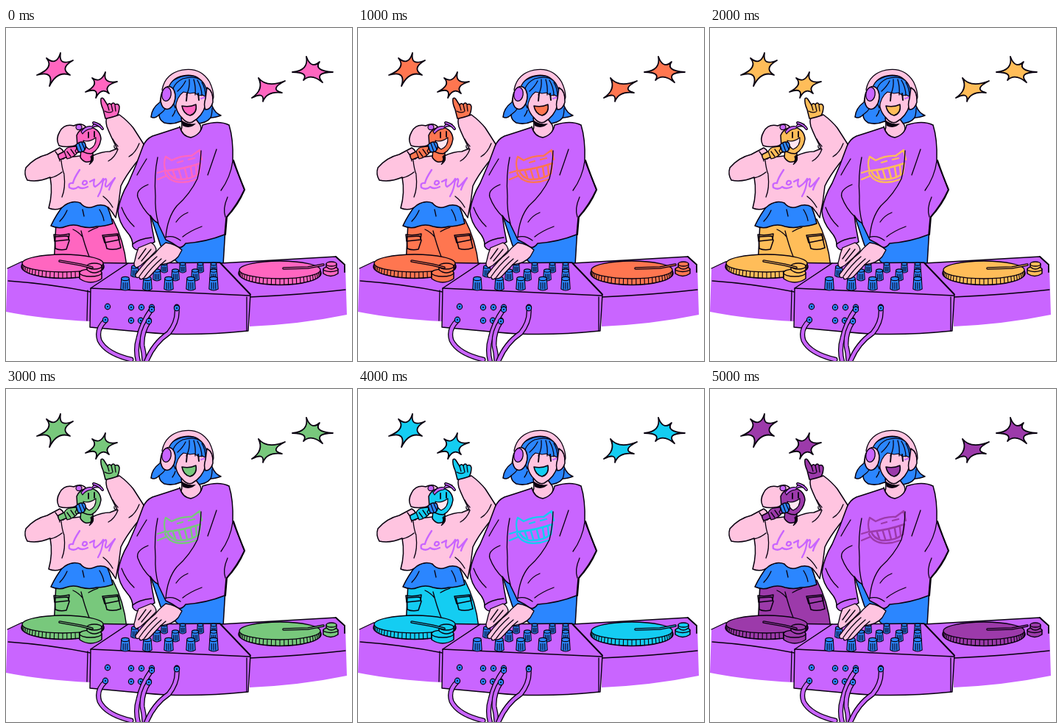
These frames come from a looping animation (470 px wide and 453 px high, 6000 ms). An HTML page with a canvas:

```html
<!DOCTYPE html>
<html lang="en">
<head>
<meta charset="utf-8">
<title>DJ set</title>
<style>
html, body { margin: 0; width: 100%; height: 100%; overflow: hidden; background: #fff; }
canvas { display: block; }
</style>
</head>
<body>
<canvas id="stage" width="470" height="453"></canvas>
<script>
const ctx = document.getElementById('stage').getContext('2d');
const INK = '#08000f', PURPLE = '#c965ff', PINK = '#ffc4e0', BLUE = '#2b86ff';
const ACCENTS = ['#ff66c0', '#ff7650', '#ffbd59', '#78c87c', '#14cdf2', '#9c3aaa'];
const STEP = 1000;
ctx.lineJoin = ctx.lineCap = 'round';

function shape(d, fill, width = 1.5) {
  const path = new Path2D(d);
  if (fill) {
    ctx.fillStyle = fill;
    ctx.fill(path);
  }
  if (width) line(path, INK, width);
}

function line(d, color = INK, width = 1.3) {
  ctx.strokeStyle = color;
  ctx.lineWidth = width;
  ctx.stroke(d instanceof Path2D ? d : new Path2D(d));
}

function oval(x, y, rx, ry, fill, width = 1.3, turn = 0) {
  const path = new Path2D();
  path.ellipse(x, y, rx, ry, turn, 0, Math.PI * 2);
  shape(path, fill, width);
}

// Inked tube: a dark stroke below a thinner coloured one.
function tube(d, color, width) {
  line(d, INK, width + 2.6);
  line(d, color, width);
}

// Spiky star: each pair of tips is joined by an arc bent towards the centre.
function star(cx, cy, tips, fill) {
  const path = new Path2D();
  path.moveTo(...tips[0]);
  tips.forEach((tip, i) => {
    const next = tips[(i + 1) % tips.length];
    const mx = (tip[0] + next[0]) / 2, my = (tip[1] + next[1]) / 2;
    path.quadraticCurveTo(mx + (cx - mx) * .85, my + (cy - my) * .85, ...next);
  });
  shape(path, fill, 1.8);
}

function stars(accent) {
  star(69, 55, [[74, 34], [91, 44], [87, 64], [59, 79], [42, 64], [55, 41]], accent);
  star(129, 78, [[135, 60], [151, 73], [140, 89], [122, 95], [108, 87], [117, 68]], accent);
  star(353, 84, [[343, 68], [379, 72], [375, 88], [349, 100], [334, 95]], accent);
  star(414, 59, [[408, 39], [426, 46], [444, 60], [430, 74], [404, 71], [389, 60]], accent);
}

function singer(accent) {
  shape('M68 264L65 324H164Q160 288 145 260Z', accent);
  line('M102 276Q107 296 113 311M112 277Q118 273 125 271M104 284Q98 277 91 274');
  shape('M66 284L84 283L86 289L82 301Q74 303 67 300Z', null);
  shape('M65 281Q75 283 86 280L85 288L66 290Z', null);
  shape('M133 284L152 282L156 299Q146 303 137 300Z', null);
  shape('M131 282L152 280L154 288L134 292Z', null);

  shape('M79 240Q68 254 61 269Q72 274 81 270Q92 266 102 270Q114 273 123 270Q134 270 145 266Q141 248 135 238Q100 231 79 240Z', BLUE);
  line('M83 248Q79 257 73 263M104 247L106 256M127 247Q132 255 133 262');

  // Raised hand
  shape('M135 123L132 111Q128 102 129 96Q131 94 133 97L138 105Q140 101 143 104Q146 100 148 104Q153 102 154 107Q154 114 151 119L150 125Z', accent);
  line('M138 105L140 112M143 104L145 113M148 105L149 113M134 113Q139 116 144 114');

  // Hoodie
  shape('M74 177L101 174L117 174Q130 168 141 168L151 164Q142 147 137 134Q135 125 137 123Q146 121 154 118Q165 126 173 136Q182 150 187 158Q185 175 176 184Q162 202 156 215Q154 236 149 258Q145 251 139 244Q130 238 119 243Q108 247 101 238Q91 234 80 241Q71 250 58 245Q64 224 60 203Q44 210 29 207Q24 199 27 190Q39 176 56 172L73 163Q81 167 78 178Z', PINK);
  line('M60 204Q69 202 76 196M75 180Q76 191 79 199M79 200Q81 218 76 230M67 168Q72 174 73 181M147 160Q146 164 152 165Q148 176 139 181M181 157Q176 170 167 175M145 151Q148 157 152 161M132 229Q140 235 145 244');
  line('M100 193Q92 205 91 211Q84 210 86 217Q93 221 98 216Q103 220 111 216M106 208Q110 207 110 211Q107 215 104 212Q104 209 106 208M114 209L120 206Q118 215 121 216Q128 212 132 205Q131 219 125 229M132 208Q137 202 136 209Q133 218 138 215Q144 209 148 204Q142 213 140 220', PURPLE, 2.3);

  // Head
  shape('M102 164L101 176Q108 187 118 179L118 167Z', accent);
  shape('M118 173Q121 181 113 186Q117 180 115 175Z', INK, 1);
  shape('M72 160Q67 151 73 141Q79 130 92 133Q102 128 108 134L104 144L100 158Q84 164 72 160Z', PINK);
  shape('M96 146Q101 134 115 135Q128 138 129 151Q127 165 116 171Q104 171 97 162Z', accent);
  oval(99, 135, 4, 3.5, PURPLE, 1.2);
  shape('M102 141Q108 132 117 134Q120 127 128 131L126 134Q119 133 116 137Q108 138 104 144Z', PURPLE, 1.2);
  tube('M119 129Q127 131 131 137', PURPLE, 1.4);
  line('M112 142V149M120 141V148', INK, 1.8);
  shape('M105 153Q113 156 122 149Q123 161 113 165Q107 162 105 153Z', '#ffe6f1', 1.2);

  // Microphone
  shape('M71 172L97 159L101 168L74 179Q70 177 71 172Z', accent);
  shape('M95 159Q101 153 107 156Q110 162 106 167Q102 170 98 168Z', BLUE);
  line('M99 157L103 168M103 156L107 165', INK, 1.2);
  shape('M79 168Q82 162 88 162L95 161Q97 164 94 167L96 171Q91 176 83 178Z', accent, 1.2);
  line('M83 168L88 175M88 165L93 172');
}

function catPrint(accent) {
  line('M217 195Q213 184 217 175L225 180Q239 173 252 174L263 166L266 179M206 197L216 194M206 206L218 201M216 197Q223 213 248 209L258 206M233 183L240 181M248 179L256 177', accent, 2.3);
  line('M219 194Q241 192 264 184L262 198Q250 207 233 206Q222 203 219 194M227 195L230 203M235 194L238 204M243 192L246 204M251 190L253 202M258 188L259 199', accent, 2.5);
}

function dj(accent) {
  shape('M196 254L210 296L236 322H295L298 272L240 282Z', BLUE);

  // Hair and neck
  shape('M229 70Q246 60 268 69Q278 82 280 106Q284 116 292 119Q284 122 278 122Q272 130 258 130L237 127Q226 132 215 129Q208 125 208 118Q202 124 197 121Q198 109 209 101Q214 78 229 70Z', BLUE);
  line('M208 118Q214 114 217 109M280 109Q280 117 278 122M226 120Q229 116 230 112');
  shape('M238 122Q241 138 235 144Q246 154 260 147Q267 139 264 132L258 124Z', PINK);
  shape('M238 125Q246 132 258 130Q250 138 240 133Z', INK, 0);

  // Sweater
  shape('M236 135Q215 142 199 147Q190 151 186 161Q177 187 166 211Q155 229 152 249Q153 264 164 277Q173 287 172 297Q176 304 183 301L202 291Q198 272 196 255Q201 263 206 265L217 288Q226 292 234 298Q239 300 244 293Q272 291 297 281L299 258Q316 241 324 220Q314 195 308 180Q309 151 303 132Q289 125 267 132Q265 145 251 149Q239 147 236 134Z', PURPLE);
  catPrint(accent);
  line('M265 167Q264 190 260 205Q250 226 232 242Q219 258 217 285M286 165Q280 183 274 200M191 178Q184 189 178 200M206 176Q201 200 203 229Q202 248 207 266M193 213Q176 220 179 230Q185 246 197 257M216 285Q226 281 237 289M172 294Q180 287 198 285M308 181Q305 203 292 221M298 257Q294 246 301 230M266 270Q250 276 240 284M231 264Q237 255 247 251M157 244Q163 260 174 270');
  line('M309 180Q315 198 324 220Q314 241 300 257L298 281', INK, 2);

  // Head and headphones
  shape('M231 90Q227 110 239 122Q246 131 253 128Q267 120 271 105L273 84Q256 72 238 76Z', PINK);
  shape('M226 99Q222 78 240 69Q263 62 273 80Q276 90 273 95L267 91L262 92L256 88L250 89L241 87Q232 93 230 109Z', BLUE, 1.2);
  line('M244 72Q240 80 233 86M249 70Q250 82 245 91M255 70Q258 80 257 91M260 71Q266 81 266 92M266 74Q271 82 271 93');
  line('M246 89L245 99M261 89L262 98', INK, 1.9);
  line('M265 96L271 94', PURPLE, 2.2);
  shape('M239 106Q250 108 258 104Q260 116 250 119Q241 117 239 106Z', accent);
  tube('M216 84Q220 65 240 61Q262 57 273 75Q278 85 278 94', PINK, 6.5);
  shape('M273 81Q282 86 281 101Q278 111 271 111Q268 105 271 96Z', PINK);
  oval(220, 95, 9.8, 15.5, PINK, 1.5, 0.14);
  oval(218, 90, 6.2, 9.5, PURPLE, 1.3, 0.14);
}

function platter(x, y, accent) {
  oval(x, y + 4.5, 56, 16, accent, 1.5);
  for (let i = 1; i < 30; i++) {
    const a = i / 30 * Math.PI, c = Math.cos(a), s = Math.sin(a);
    line(`M${x + 55 * c} ${y + 12 * s}L${x + 56 * c} ${y + 4.5 + 16 * s}`, INK, 1.1);
  }
  oval(x, y, 55, 12, accent, 1.3);
}

function drum(x, y, rx, ry, h, fill) {
  shape(`M${x - rx} ${y}V${y + h}Q${x} ${y + h + ry * 2} ${x + rx} ${y + h}V${y}Z`, fill);
  oval(x, y, rx, ry, fill);
}

function decks(accent) {
  shape('M2 327L21 318L166 320L116 354L114 399Q50 396 0 386Z', PURPLE, 0);
  line('M2 327L21 318L166 320L116 354M3 344Q60 348 115 359', INK, 1.3);
  line('M111 357L110 398');
  shape('M291 320L448 311L461 325L463 390Q400 403 331 406L330 363Z', PURPLE, 0);
  line('M291 320L448 311L460 322M331 366Q400 363 461 356');
  line('M448 311L460 322V332', INK, 1.8);

  platter(77, 320, accent);
  drum(115, 333, 15, 5, 8, accent);
  drum(120, 324, 10, 4, 5, accent);
  tube('M73 317L101 322L117 326', accent, 1);

  platter(372, 329, accent);
  drum(441, 328, 10, 3.5, 6, accent);
  drum(442, 321, 7, 3, 4, accent);
  tube('M377 327L410 326L431 322', accent, 1);
}

function knob(x, y, size) {
  const w = 6.2 * size, h = 7 * size;
  shape(`M${x - w * .85} ${y - h}L${x - w} ${y + h}Q${x} ${y + h + 4} ${x + w} ${y + h}L${x + w * .85} ${y - h}Z`, BLUE, 1.1);
  oval(x, y - h, w * .85, 2.6 * size, BLUE, 1.1);
  for (const k of [-.45, 0, .45]) line(`M${x + w * k} ${y - h * .2}V${y + h}`, INK, 1.1);
}

function jack(x, y) {
  oval(x, y, 3.6, 3.8, BLUE, 1.2);
  oval(x, y, 1, 1, INK, 0);
}

function mixer() {
  shape('M166 320L291 319L332 362L329 412Q250 420 190 414L114 407L115 354Z', PURPLE, 1.4);
  line('M115 354L331 364M291 320L332 363M327 366V412');
  const rows = [
    [326, .72, [215, 240, 264, 282]],
    [331, .85, [175]],
    [336, .85, [205, 230, 257, 282]],
    [348, 1, [162, 192, 221, 251, 282]]
  ];
  for (const [y, size, xs] of rows) xs.forEach(x => knob(x, y, size));
  jack(138, 379);
  for (const x of [170, 184, 198, 232]) jack(x, 380);
  for (const x of [170, 183, 194]) jack(x, 398);

  tube('M135 398Q122 410 127 425Q136 443 170 451', PURPLE, 4.5);
  tube('M198 382Q184 402 180 422Q175 438 180 455', PURPLE, 4.5);
  tube('M194 399Q184 414 185 432Q188 444 188 455', PURPLE, 4.5);
  tube('M232 381Q234 399 221 415Q200 429 190 455', PURPLE, 4.5);
  for (const [x, y] of [[135, 397], [198, 383], [194, 399], [232, 381]]) jack(x, y);
}

function hands() {
  shape('M180 299L197 292Q204 296 204 303Q195 313 183 323L177 326Q172 323 175 316Q177 306 180 299Z', PINK, 1.3);
  line('M190 300L180 314M197 301L184 317');
  shape('M217 292Q207 300 203 306Q191 315 176 335Q175 341 181 339Q182 344 187 340Q191 343 198 335L210 322Q227 320 234 311L239 302Q231 294 217 292Z', PINK, 1.3);
  line('M205 311Q192 322 181 338M211 314Q198 325 188 339M210 322L217 316');
}

function draw(accent) {
  ctx.fillStyle = '#fff';
  ctx.fillRect(0, 0, 470, 453);
  stars(accent);
  singer(accent);
  dj(accent);
  decks(accent);
  mixer();
  hands();
}

let start, shown = -1;
function tick(now) {
  start ??= now;
  const index = Math.floor((now - start) / STEP) % ACCENTS.length;
  if (index !== shown) {
    shown = index;
    draw(ACCENTS[index]);
  }
  requestAnimationFrame(tick);
}
draw(ACCENTS[0]);
requestAnimationFrame(tick);
</script>
</body>
</html>
```
